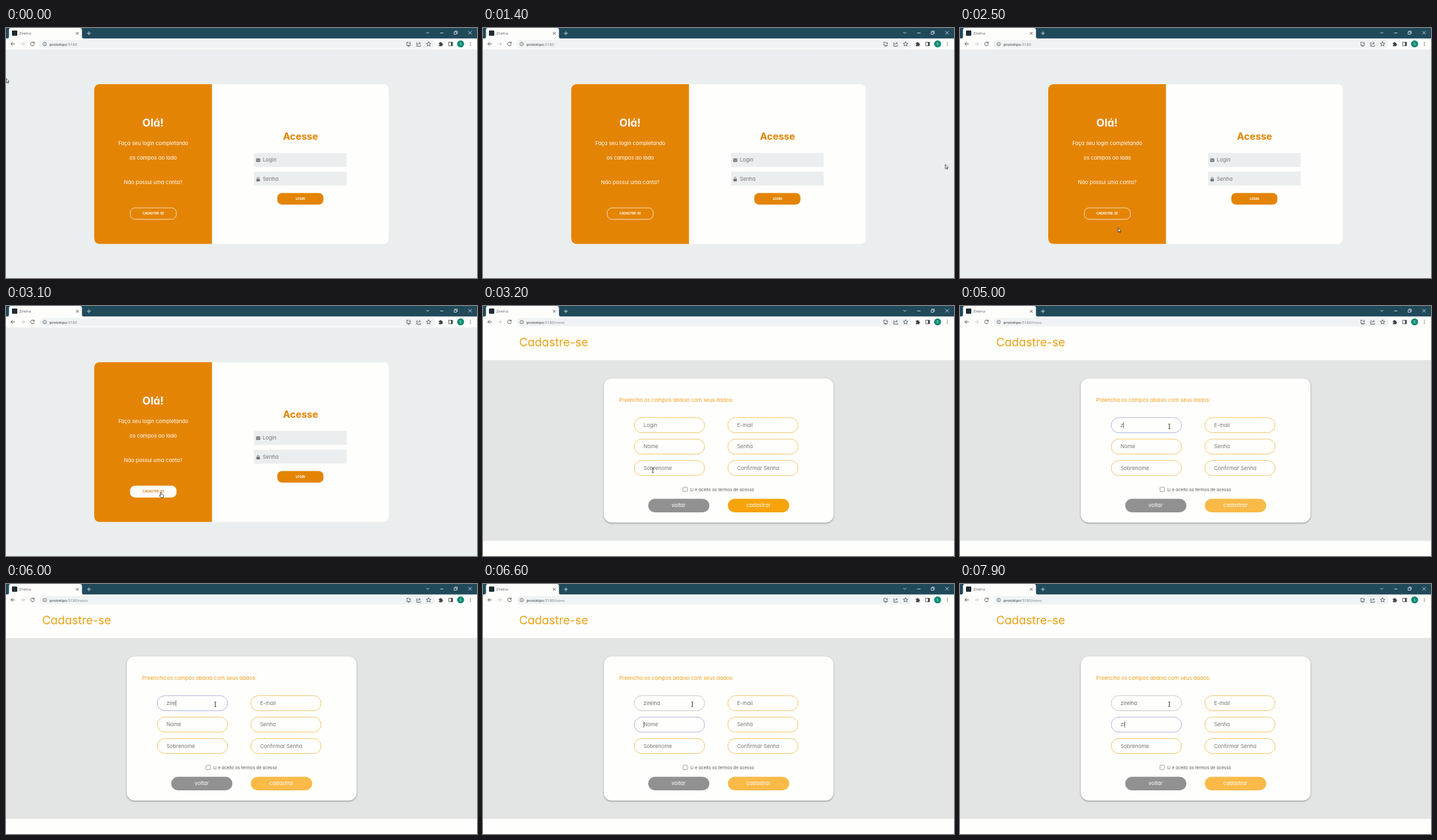
These frames come from a looping animation (710x378 px, 8 s). An HTML page:

```html
<!DOCTYPE html>
<html lang="pt">
<head>
<meta charset="utf-8">
<title>Zirelna</title>
<style>
  html, body { margin: 0; width: 100%; height: 100%; overflow: hidden; background: #fdfefc; }
  svg { display: block; width: 710px; height: 378px; }
  text { font: 7.9px Inter, "Open Sans", sans-serif; font-feature-settings: "cv11"; }
  #browser text { font-family: "Open Sans", sans-serif; }
  .mid { text-anchor: middle; }
  .white { fill: #fff; }
  .hint { fill: #757575; }
  .bold { font-weight: 700; }
  .small { font-size: 4.55px; }
  .line { fill: none; stroke: #4b4f52; stroke-width: .9; }
  .light { stroke: #dfe8ea; stroke-width: .8; }
</style>
</head>
<body>
<svg viewBox="0 0 710 378">
  <g id="login">
    <rect y="32" width="710" height="346" fill="#ebeeee"/>
    <rect x="133" y="85" width="444" height="241.5" rx="8" fill="#fefffc"/>
    <path d="M310.5 85H141a8 8 0 0 0-8 8v225.500a8 8 0 0 0 8 8h169.500z" fill="#e48404"/>
    <g class="mid white">
      <text class="bold" x="221.700" y="148.500" style="font-size:16px">Olá!</text>
      <text x="222" y="177.300">Faça seu login completando</text>
      <text x="222" y="198.500">os campos ao lado</text>
      <text x="222" y="236.300">Não possui uma conta?</text>
    </g>
    <rect id="signup" x="187.300" y="272" width="69.400" height="17.200" rx="7" stroke="#fff" stroke-width=".7"/>
    <text id="signupText" class="mid bold small" x="222" y="281.800">CADASTRE-SE</text>

    <text class="mid bold" x="444" y="168.600" fill="#e48404" style="font-size:14.700px">Acesse</text>
    <g fill="#ebeeee">
      <rect x="374" y="189" width="139.500" height="21"/>
      <rect x="374" y="217.300" width="139.500" height="21"/>
    </g>
    <rect x="377" y="197.200" width="6.400" height="5.200" rx=".8" fill="#757575"/>
    <path d="M377 198.600l3.200 2.100 3.200-2.100" fill="none" stroke="#ebeeee" stroke-width=".6"/>
    <rect x="377.500" y="228" width="5.200" height="4" rx=".7" fill="#757575"/>
    <path d="M378.700 228.200v-1.200a1.400 1.400 0 0 1 2.800 0v1.200" fill="none" stroke="#757575" stroke-width=".8"/>
    <text class="hint" x="387" y="202.200">Login</text>
    <text class="hint" x="387" y="230.700">Senha</text>
    <rect x="409" y="249.500" width="69.500" height="17.500" rx="7" fill="#e48404"/>
    <text class="mid bold small white" x="443.700" y="259.700">LOGIN</text>
  </g>

  <g id="form">
    <rect y="32" width="710" height="346" fill="#fefffc"/>
    <rect y="81.700" width="710" height="273.500" fill="#e2e5e4"/>
    <text x="54.500" y="61.300" fill="#eea016" style="font-size:17.500px">Cadastre-se</text>
    <rect x="182" y="109.500" width="346.500" height="218" rx="12" fill="#fefffc"
      style="filter:drop-shadow(0 1px 1.200px rgba(0,0,0,.4))"/>
    <text x="205" y="144.800" fill="#f29d1e">Preencha os campos abaixo com seus dados:</text>
    <g id="fields"></g>
    <rect x="301.500" y="274" width="6.600" height="6.600" rx="1" fill="#fff" stroke="#7d7d7d" stroke-width=".7"/>
    <text x="312.500" y="279.700" fill="#555" style="font-size:6.400px">Li e aceito os termos de acesso</text>
    <rect x="249" y="291.500" width="92.300" height="20.500" rx="10.250" fill="#919191"/>
    <rect id="send" x="369" y="291.500" width="92.700" height="20.500" rx="10.250" fill="#f7a30c"/>
    <g class="mid white" font-weight="500">
      <text x="295" y="304.400">voltar</text>
      <text x="415.200" y="304.400">cadastrar</text>
    </g>
    <rect id="caret" width=".7" height="9" fill="#444"/>
  </g>

  <g id="browser">
    <rect width="710" height="16" fill="#20495a"/>
    <path d="M2 16q2.500 0 2.500-3V3q0-3 3-3h104q3 0 3 3v10q0 3 2.500 3z" fill="#fdfefc"/>
    <rect y="15.800" width="710" height="16.500" fill="#fdfefc"/>
    <rect x="9" y="3.700" width="8" height="8" rx="1" fill="#1d2b33"/>
    <text x="20" y="9.900" fill="#5b6064" style="font-size:5.600px">Zirelna</text>
    <path class="line" d="M105.500 6l4 4m0-4l-4 4"/>
    <path class="line light" d="M122 8h6m-3-3v6M633.500 6l2.300 2.300 2.300-2.300M654.500 7.500h5M675.500 5.900h3.600v3.600h-3.600zM676.700 5.900v-1.200h3.600v3.600h-1.200M697 4.700l5 5m0-5l-5 5"/>
    <path class="line" d="M13.300 24H7.500m2.700-2.800L7.400 24l2.800 2.800M42.200 22.300a2.800 2.800 0 1 0 .5 2.300M42.700 20.800v2.200h-2.200"/>
    <path class="line" style="stroke:#bfc3c5" d="M22 24h5.800m-2.700-2.800l2.800 2.800-2.800 2.800"/>
    <rect x="50.500" y="18" width="596" height="12.800" rx="6.400" fill="#f0f3f3"/>
    <circle class="line" cx="58.300" cy="24.300" r="2.600" style="stroke-width:.700"/>
    <path class="line" d="M58.300 24v1.600m0-2.900v.6" style="stroke-width:.700"/>
    <text x="65.500" y="26.500" fill="#25292b" style="font-size:6px">prototipo<tspan id="path" fill="#777c80">:5180</tspan></text>
    <g class="line" style="stroke-width:.800">
      <path d="M607 21.500h-2.700v4.800h5.400v-1.500M605.500 27.700h3M608.900 21v3m-1.400-1.300l1.400 1.400 1.400-1.400"/>
      <path d="M620.500 22.500h-1.400v5h5.800v-1.700M620.700 25.500q.4-2.500 3.500-2.500m-1.300-1.600l1.700 1.600-1.700 1.600"/>
      <path d="M637 20.700l1 2.300 2.500.2-1.900 1.600.6 2.400-2.200-1.300-2.200 1.300.6-2.400-1.900-1.600 2.500-.2z"/>
      <rect x="667.500" y="21.500" width="5.600" height="5.400"/>
    </g>
    <path d="M652.500 22.300h1.500a1.100 1.100 0 0 1 2.200 0h1.500v1.600a1.100 1.100 0 0 1 0 2.200v1.500h-5.200v-1.700a1 1 0 0 0 0-2zM670.700 21.500h2.400v5.400h-2.400z" fill="#3f4447"/>
    <circle cx="685.300" cy="24" r="5.300" fill="#0c8a72"/>
    <text class="mid white" x="685.300" y="26" style="font-size:5.500px">S</text>
    <path d="M700 21.600v.01M700 24v.01M700 26.400v.01" stroke="#444" stroke-width="1.300" stroke-linecap="round"/>
  </g>

  <g id="pointer" stroke="#1c1c1c" stroke-linejoin="round">
    <path id="arrow" d="M.3.300v6.500l1.500-1.400 1 2.200 1-.4-1-2.100h2z" fill="#fff" stroke-width=".700"/>
    <path id="hand" d="M.2.800q.8-1 1.400 0v2.900l2.700.6q.9.300.8 1.300l-.5 3.200h-3.400l-2.300-3q0-1 1.300-.2z" fill="#fff" stroke-width=".700"/>
    <path id="beam" d="M-1.300-3.600q1.300 0 1.300.6 0-.6 1.300-.6M0-3v6M-1.300 3.600q1.300 0 1.300-.6 0 .6 1.300.6" fill="none" stroke-width=".800"/>
  </g>
</svg>
<script>
const $ = id => document.getElementById(id);
const LOOP = 8000, HOVER = 2700, OPEN = 3200, FOCUS = 3700, TYPE = 4900, NEXT = 6600;
const WORD = 'zirelna';
const GOLD = '#f5c673', ACTIVE = '#b5b5e2', FILLED = '#cbc8cb';

// time, x, y of the pointer
const track = [
  [0, 0, 76], [100, 0, 76], [200, -1, 76], [300, -1, 76], [400, 60, 110],
  [700, 640, 352], [800, 715, 359], [1100, 715, 168], [1200, 706, 168],
  [1500, 692, 225], [1800, 648, 308], [2000, 682, 314], [2100, 600, 312],
  [2300, 340, 300], [2500, 238, 302], [2900, 232.5, 281], [3100, 232.5, 281],
  [3200, 256, 248.500], [3600, 315.5, 181.5], [4500, 315.5, 181.5],
  [4600, 315.5, 182], [LOOP, 315.5, 182]
];
// time of each key press, with the letters then visible
const typing = [
  [[TYPE, 1], [5700, 3], [6000, 4], [6100, 5], [6200, 6], [6300, 7]],
  [[7600, 1], [7900, 2]]
];

const labels = ['Login', 'Nome', 'Sobrenome', 'E-mail', 'Senha', 'Confirmar Senha'];
$('fields').innerHTML = labels.map((label, i) => {
  const x = i < 3 ? 228 : 369, y = 168.8 + i % 3 * 32.4;
  return `<rect x="${x}" y="${y}" width="106" height="22.8" rx="11.4" fill="#fefffc" stroke="${GOLD}"/>
    <text class="hint" x="${x + 14}" y="${y + 14.2}">${label}</text>`;
}).join('');
const boxes = $('fields').querySelectorAll('rect');
const texts = $('fields').querySelectorAll('text');

const clamp = v => Math.max(0, Math.min(1, v));
const mix = (a, b, k) => `rgb(${a.map((v, i) => Math.round(v + (b[i] - v) * k))})`;
const show = (id, on) => $(id).style.display = on ? '' : 'none';

function pointerAt(t) {
  const i = track.findIndex(key => key[0] > t);
  const [t0, x0, y0] = track[i - 1], [t1, x1, y1] = track[i];
  const k = (t - t0) / (t1 - t0);
  return [x0 + (x1 - x0) * k, y0 + (y1 - y0) * k];
}

function drawFields(t) {
  const current = t < NEXT ? 0 : 1;
  typing.forEach((keys, i) => {
    const pressed = keys.filter(key => key[0] <= t).pop();
    const value = pressed ? WORD.slice(0, pressed[1]) : '';
    const focused = t >= FOCUS && i === current;
    texts[i].textContent = value || labels[i];
    texts[i].style.fill = value ? '#666' : '';
    boxes[i].style.stroke = focused ? ACTIVE : value ? FILLED : GOLD;
    if (focused) {
      const width = value ? texts[i].getComputedTextLength() : 0;
      $('caret').setAttribute('x', 242 + width);
      $('caret').setAttribute('y', 175.800 + i * 32.4);
    }
  });
  show('caret', t >= FOCUS && !(t >= 5500 && t < 5700));
  $('send').style.opacity = 1 - .25 * clamp((t - TYPE + 100) / 200);
}

function draw(t) {
  const onForm = t >= OPEN, hover = clamp((t - HOVER) / 300);
  show('login', !onForm);
  show('form', onForm);
  $('path').textContent = onForm ? ':5180/novo' : ':5180';
  $('signup').style.fill = mix([228, 132, 4], [253, 251, 247], hover);
  $('signupText').style.fill = mix([255, 255, 255], [224, 140, 40], hover);
  if (onForm) drawFields(t);
  $('pointer').setAttribute('transform', `translate(${pointerAt(t)})`);
  show('arrow', t < HOVER);
  show('hand', t >= HOVER && !onForm);
  show('beam', onForm);
}

const start = performance.now();
function tick() {
  const t = (performance.now() - start) % LOOP;
  draw(Math.floor(t / 100) * 100); // ten pictures per second
  requestAnimationFrame(tick);
}
tick();
</script>
</body>
</html>
```
